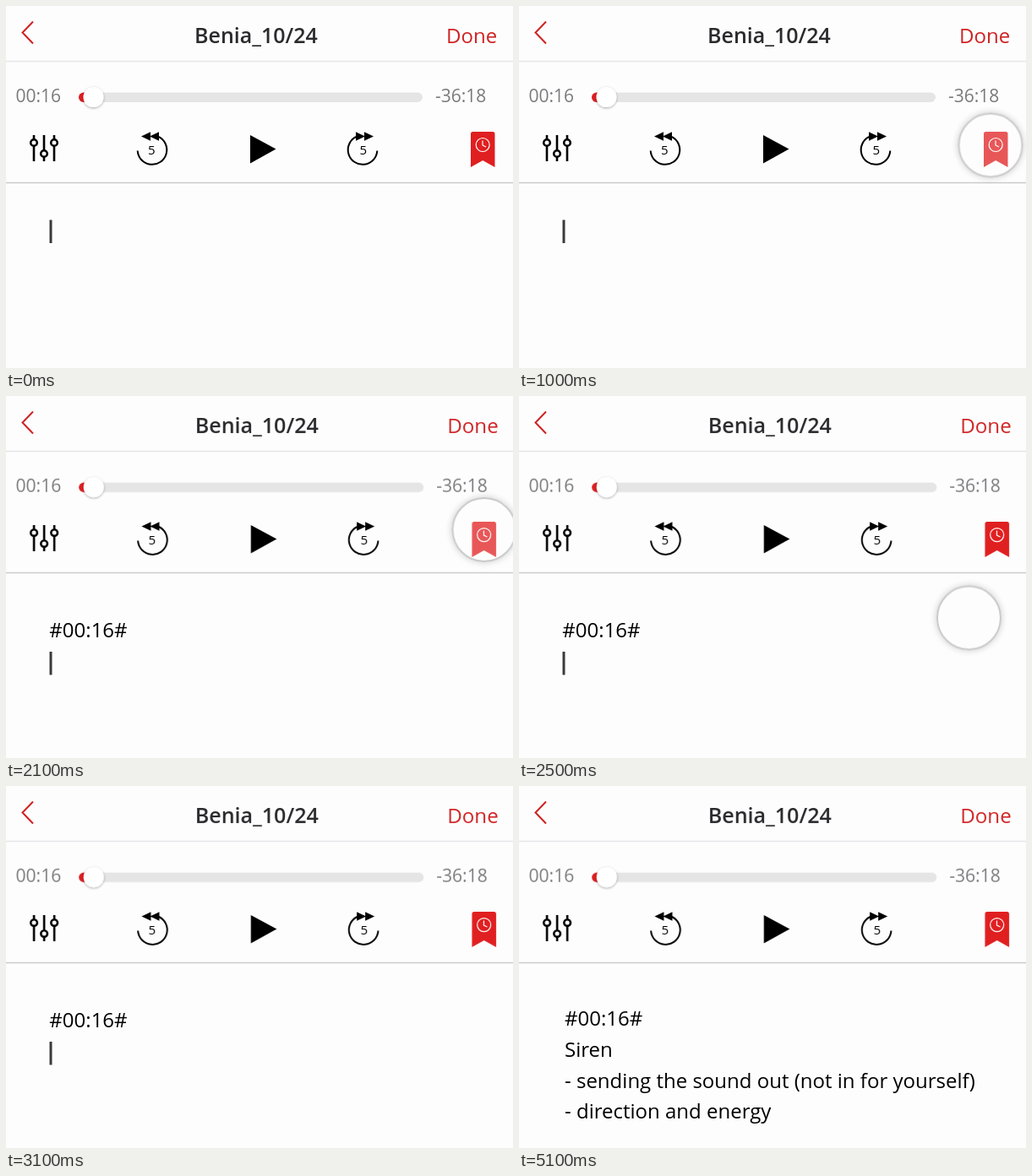
Write an HTML page that moves like this. It is 600x429 px and loops after 5.6 s.

```html
<!DOCTYPE html>
<html lang="en">
<head>
<meta charset="utf-8">
<title>Audio notes</title>
<style>
html, body { margin: 0; width: 100%; height: 100%; overflow: hidden; background: #fefdfe; }
#stage { position: relative; width: 600px; height: 429px; overflow: hidden; }
svg { display: block; }
text { font-family: "Open Sans", "Noto Sans", sans-serif; font-size: 24px; }
.title { font-size: 25px; font-weight: 600; fill: #2b2a2c; text-anchor: middle; }
.done { fill: #cf2222; }
.time { font-size: 21px; fill: #7b7a7c; }
.skip text { font-size: 15px; text-anchor: middle; }
.line { fill: none; stroke: #000; stroke-width: 2; }
.caret { fill: #3a3a3c; }

#bar, .before, .stamp, .notes, #touch { animation: 5600ms infinite; }
#bar { animation-name: widen; }
.before { animation-name: leave; }
.stamp { animation-name: stamp; }
.notes { animation-name: notes; }

#touch {
  position: absolute; left: -38.5px; top: -38.5px; width: 77px; height: 77px;
  box-sizing: border-box; border: 2px solid #c9c8c9; border-radius: 50%;
  background: rgba(255, 255, 255, .25); box-shadow: 0 0 8px rgba(0, 0, 0, .2);
  animation-name: touch; animation-timing-function: step-end;
}

/* 100 ms is 1.786 % of the loop */
@keyframes widen {
  0%, 32.14% { transform: none; animation-timing-function: steps(3); }
  37.49%, 100% { transform: scaleX(1.0026); }
}
@keyframes leave {
  0%, 32.14% { opacity: 1; animation-timing-function: steps(3); }
  37.49%, 100% { opacity: 0; }
}
@keyframes stamp {
  0%, 32.14% { opacity: 0; animation-timing-function: steps(3); }
  37.49% { opacity: 1; animation-timing-function: step-end; }
  71.42%, 100% { opacity: 0; }
}
@keyframes notes {
  0% { opacity: 0; animation-timing-function: step-end; }
  71.42%, 100% { opacity: 1; }
}
@keyframes touch {
  0% { opacity: 0; transform: translate(504px, 317px); }
  14.28% { opacity: 1; transform: translate(504px, 317px); }
  16.07% { opacity: 1; transform: translate(536px, 220px); }
  17.85% { opacity: 1; transform: translate(557.5px, 164.5px); }
  19.64% { opacity: 1; transform: translate(564.5px, 159px); }
  23.21% { opacity: 1; transform: translate(565.5px, 158px); }
  39.28% { opacity: 1; transform: translate(565.5px, 158px); animation-timing-function: steps(5); }
  48.2% { opacity: 1; transform: translate(509.5px, 332px); }
  49.99%, 100% { opacity: 0; transform: translate(509.5px, 332px); }
}
</style>
</head>
<body>
<div id="stage">
  <svg width="600" height="429" viewBox="0 0 600 429">
    <defs>
      <filter id="soft" x="-50%" y="-50%" width="200%" height="200%">
        <feDropShadow dx="0" dy="1" stdDeviation="1.8" flood-opacity=".35"/>
      </filter>
      <g id="turn">
        <path class="line" d="M-17.3 1A17.3 17.3 0 1 0 7 -15.8"/>
        <path d="M-13 -16l11 -5.3v10.6zM-3 -16l11 -5.3v10.6z"/>
      </g>
    </defs>

    <path d="M0 65.5H600" stroke="#e5e4e6" stroke-width="1.4"/>
    <path d="M0 209.5H600" stroke="#cbcacc" stroke-width="1.5"/>
    <path class="line" d="M32 18.5L19.5 31.5L32 44.5" style="stroke:#cf2222"/>

    <g id="bar">
      <text class="title" x="296" y="43.5">Benia_10/24</text>
      <text class="done" x="521" y="43.5">Done</text>
      <text class="time" x="11.5" y="113.5">00:16</text>
      <text class="time" x="508" y="113.5">-36:18</text>

      <rect x="86" y="102.5" width="407" height="11.5" rx="5.75" fill="#e6e5e6"/>
      <rect x="86" y="102.5" width="18" height="11.5" rx="5.75" fill="#dd1f22"/>
      <circle cx="103.5" cy="108" r="12" fill="#fff" filter="url(#soft)"/>

      <g class="line" style="stroke-width:2.6">
        <path d="M33 153v5m0 8v18M45 153v18m0 8v5M57 153v5m0 8v18"/>
        <circle cx="33" cy="162" r="3.8"/>
        <circle cx="45" cy="175" r="3.8"/>
        <circle cx="57" cy="162" r="3.8"/>
      </g>

      <g class="skip">
        <use href="#turn" x="173" y="170.5"/>
        <text x="172.3" y="175.5">5</text>
        <use href="#turn" transform="translate(422 170.5) scale(-1 1)"/>
        <text x="422.7" y="175.5">5</text>
      </g>
      <path d="M289 153L319.5 169.5L289 186.5z"/>

      <path d="M550 191V151.500q0 -2.500 2.500 -2.500H576q2.500 0 2.500 2.500V191L564.200 183z" fill="#e01f20"/>
      <g fill="none" stroke="#fff" stroke-width="1.2">
        <circle cx="564.2" cy="164.500" r="8"/>
        <path d="M564 159.500v5.500l4 2"/>
      </g>
    </g>

    <rect class="caret before" x="51.5" y="253.500" width="3" height="27.500"/>
    <g class="stamp">
      <text x="51.300" y="285.500">#00:16#</text>
      <rect class="caret" x="51.5" y="303" width="3" height="27.500"/>
    </g>
    <g class="notes">
      <text x="54" y="284">#00:16#</text>
      <text x="54" y="321">Siren</text>
      <text x="54" y="357.500">- sending the sound out (not in for yourself)</text>
      <text x="54" y="393.500">- direction and energy</text>
    </g>
  </svg>
  <div id="touch"></div>
</div>
</body>
</html>
```
